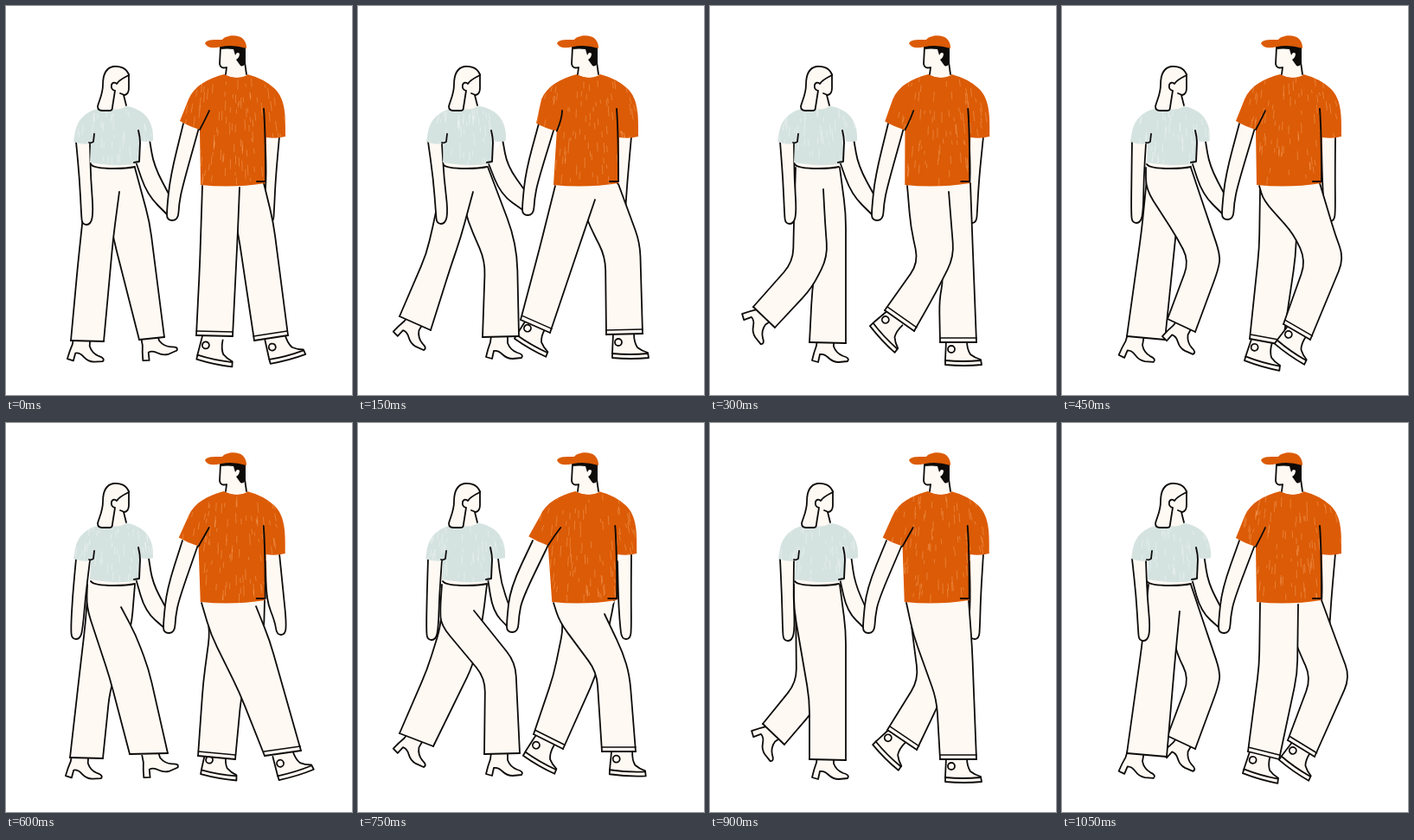
An HTML page with a canvas for the animation above (1200 ms loop, 400x450 px).

```html
<!DOCTYPE html>
<html lang="en">
<head>
<meta charset="utf-8">
<title>Walking couple</title>
<style>
  html, body { margin: 0; width: 100%; height: 100%; overflow: hidden; background: #fff; }
  canvas { display: block; width: 400px; height: 450px; }
</style>
</head>
<body>
<canvas id="stage"></canvas>
<script>
const STEP_MS = 150;
const INK = '#0d0b0a', CREAM = '#fff9f3', ORANGE = '#dc5b06', MINT = '#d5e3e0';
const canvas = document.getElementById('stage');
const ctx = canvas.getContext('2d');
const ratio = window.devicePixelRatio || 1;
canvas.width = 400 * ratio;
canvas.height = 450 * ratio;

// Legs: [left edge, right edge]; feet, near then far: [ankle x, ankle y, angle].
const woman = [
  { head: 0, top: 0, arm: [87, 252],
    near: ['97,187 92,215 83,300 75,387', '131,215 124,268 113,388'],
    far: ['112,200 124,268 154,386', '149,187 166,250 183,383'],
    feet: [[89, 388, 3], [168, 385, -18]] },
  { head: -1, top: 1, arm: [90, 251],
    near: ['98,187 90,240 79,287 48,359', '133,215 119,267 107,302 84,375'],
    far: ['115,200 127,249 147,295 144,383', '150,186 178,260 184,290 186,382'],
    feet: [[66, 367, 30], [165, 385, 0]] },
  { head: -1, top: 0, arm: [86, 251],
    near: ['99,187 97,250 96,296 50,348', '131,212 133,250 136,290 118,326 75,372'],
    far: ['115,200 122,300 118,330 115,389', '150,187 157,240 157,390'],
    feet: [[64, 359, 57], [135, 389, 0]] },
  { head: 2, top: 1, arm: [80, 250],
    near: ['97,187 97,212 133,268 147,295 122,362', '149,187 165,235 183,288 181,304 154,377'],
    far: ['98,200 92,260 75,382', '136,218 131,270 119,386'],
    feet: [[141, 372, 29], [86, 386, 10]] },
  { head: 0, top: 0, arm: [75, 249],
    near: ['94,187 93,213 120,295 143,383', '133,213 150,245 165,285 187,382'],
    far: ['94,200 92,230 85,290 74,387', '149,187 145,235 120,310 112,388'],
    feet: [[169, 385, -18], [87, 388, 3]] },
  { head: -1, top: 0, arm: [79, 250],
    near: ['97,187 95,215 96,234 147,295 146,383', '134,217 182,277 187,382'],
    far: ['97,195 96,234 80,285 48,359', '149,187 144,228 133,280 87,374'],
    feet: [[165, 385, 0], [66, 367, 30]] },
  { head: 0, top: 1, arm: [84, 251],
    near: ['97,187 97,215 115,320 115,389', '150,187 157,240 157,390'],
    far: ['99,200 100,300 61,348', '136,215 136,285 122,330 86,372'],
    feet: [[135, 389, 0], [75, 359, 57]] },
  { head: 2, top: 2, arm: [88, 251],
    near: ['100,187 92,260 75,382', '136,218 131,270 121,386'],
    far: ['118,200 133,268 147,295 122,362', '149,187 165,235 183,288 181,304 154,377'],
    feet: [[86, 385, 10], [141, 372, 29]] }
];

const man = [
  { sleeve: 0, arm: [310, 250], hand: [186, 243],
    near: ['227,208 224,300 220,381', '270,210 268,260 262,382'],
    far: ['255,212 268,260 287,387', '298,205 309,250 326,381'],
    feet: [[239, 388, 12], [313, 387, -15]] },
  { sleeve: 4, arm: [310, 237], hand: [190, 237],
    near: ['228,208 210,280 188,363', '274,224 256,277 222,378'],
    far: ['252,212 268,255 286,290 287,380', '301,206 326,274 329,379'],
    feet: [[205, 371, 30], [308, 383, 0]] },
  { sleeve: 1, arm: [309, 250], hand: [187, 243],
    near: ['228,208 232,255 241,297 202,352', '276,215 282,290 262,330 236,376'],
    far: ['250,212 270,315 265,340 266,389', '301,205 303,260 308,389'],
    feet: [[212, 364, 47], [286, 391, 0]] },
  { sleeve: 0, arm: [316, 248], hand: [185, 242],
    near: ['228,208 233,225 268,264 282,295 256,368', '298,205 316,265 326,292 287,386'],
    far: ['229,212 228,280 217,385', '273,212 270,290 255,392'],
    feet: [[271, 379, 35], [231, 391, 16]] },
  { sleeve: -1, arm: [324, 244], hand: [182, 238],
    near: ['226,208 237,245 270,312 299,385', '289,212 305,252 341,379'],
    far: ['230,212 236,240 228,300 222,385', '299,205 298,244 272,315 265,389'],
    feet: [[322, 386, -17], [243, 385, 10]] },
  { sleeve: -3, arm: [316, 249], hand: [172, 237],
    near: ['226,208 233,230 276,288 282,380', '285,221 306,265 314,292 321,380'],
    far: ['230,212 238,234 226,292 203,360', '296,206 291,233 275,292 237,377'],
    feet: [[306, 383, 3], [215, 371, 30]] },
  { sleeve: -1, arm: [312, 249], hand: [177, 238],
    near: ['227,208 235,245 262,320 266,389', '299,205 303,260 308,389'],
    far: ['230,212 241,297 205,355', '280,215 280,290 262,330 239,378'],
    feet: [[286, 391, 0], [215, 365, 45]] },
  { sleeve: 0, arm: [310, 239], hand: [181, 238],
    near: ['229,208 228,280 215,380', '273,210 272,290 251,389'],
    far: ['255,212 273,262 288,295 261,367', '300,205 322,265 333,294 292,386'],
    feet: [[229, 386, 16], [276, 378, 35]] }
];

const points = text => text.split(' ').map(pair => pair.split(',').map(Number));

// Polyline with rounded corners; a large radius makes it one flowing curve.
function trace(path, pts, radius, start = 'moveTo') {
  const towards = (p, q) => {
    const d = Math.hypot(q[0] - p[0], q[1] - p[1]);
    const t = Math.min(radius / d, 0.5);
    return [p[0] + (q[0] - p[0]) * t, p[1] + (q[1] - p[1]) * t];
  };
  path[start](...pts[0]);
  for (let i = 1; i < pts.length - 1; i++) {
    path.lineTo(...towards(pts[i], pts[i - 1]));
    path.quadraticCurveTo(...pts[i], ...towards(pts[i], pts[i + 1]));
  }
  path.lineTo(...pts[pts.length - 1]);
  return path;
}

const curve = (pts, radius = 60) => trace(new Path2D(), pts, radius);
const asPath = shape => typeof shape === 'string' ? new Path2D(shape) : shape;

// Closed area between two edges that run side by side.
function between(left, right, radius, corner) {
  const area = trace(new Path2D(), left, radius);
  trace(area, right.slice().reverse(), radius, 'lineTo');
  if (corner) area.lineTo(...corner);
  return area;
}

function fill(shape, color = CREAM) {
  ctx.fillStyle = color;
  ctx.fill(asPath(shape));
}

function line(shape, width = 1.8) {
  ctx.lineWidth = width;
  ctx.stroke(asPath(shape));
}

function outlined(shape) {
  fill(shape);
  line(shape);
}

function at(x, y, angle, draw) {
  ctx.save();
  ctx.translate(x, y);
  ctx.rotate(angle * Math.PI / 180);
  draw();
  ctx.restore();
}

function boot() {
  outlined('M-11 -4 L-12 4 Q-15 12 -17 21 L-10 23 L-8 14 Q-3 13 2 18 Q7 23 14 23 L24 22 Q27 18 19 16 Q11 13 8 5 L8 -4');
}

function sneaker() {
  outlined('M-13 -4 L-14 18 L-14 24 Q8 26 28 24 L27 18 Q20 16 15 12 Q11 6 11 -4');
  line('M-14 19 Q6 21 27 19');
  line('M-3 6 A4 4 0 1 1 -11 6 A4 4 0 1 1 -3 6');
}

function leg(edges, corner, cuff) {
  const radius = 16;
  const [left, right] = edges.map(points);
  const [a, b] = [left, right].map(edge => edge[edge.length - 1]);
  fill(between(left, right, radius, corner));
  line(curve(left, radius));
  line(curve(right, radius));
  line(curve([a, b]));
  if (cuff) {
    const d = Math.hypot(b[0] - a[0], b[1] - a[1]) / 5;
    const nx = (b[1] - a[1]) / d, ny = (a[0] - b[0]) / d;
    line(curve([[a[0] + nx, a[1] + ny], [b[0] + nx, b[1] + ny]]), 1.5);
  }
}

function legs(pose, shoe, corner, cuff) {
  at(...pose.feet[1], shoe);
  leg(pose.far, null, cuff);
  at(...pose.feet[0], shoe);
  leg(pose.near, corner, cuff);
}

// Pale crayon streaks inside a shirt.
function streaks(shape, box, count, color, seed) {
  let state = seed * 7919 + 17;
  const random = () => (state = (state * 16807) % 2147483647) / 2147483647;
  random();
  ctx.save();
  ctx.clip(asPath(shape));
  ctx.strokeStyle = color;
  ctx.lineWidth = 0.8;
  for (let i = 0; i < count; i++) {
    const x = box[0] + random() * box[2], y = box[1] + random() * box[3];
    const lean = (x - box[0] - box[2] / 2) * 0.03;
    ctx.beginPath();
    ctx.moveTo(x, y);
    ctx.lineTo(x + lean, y + 3 + random() * 9);
    ctx.stroke();
  }
  ctx.restore();
}

function womanArm([x, b]) {
  outlined(curve([[81, 157], [(81 + 2 * x) / 3, 200], [x, b - 12], [x + 1, b + 1], [x + 11, b + 1],
    [x + 14, b - 14], [(x + 109) / 2, 200], [97, 159]]));
}

function manArm([x, b]) {
  outlined(curve([[300, 160], [301, 205], [x - 13, b - 14], [x - 11, b + 1], [x - 1, b + 1],
    [x, b - 14], [(315 + 2 * x) / 3, 200], [316, 151]]));
}

function joinedArms([x, y], sleeve) {
  const swing = x - 186;
  const upper = [[166 + swing * 0.3, 155], [171 + swing * 0.4, 185], [x + 4, y - 22]];
  const lower = [[150, 180], [163 + swing * 0.5, 218], [x + 2, y]];
  fill(between(upper, lower, 60));
  line(curve(upper));
  line(curve(lower));
  outlined(curve([[205 + sleeve, 136], [x + 4, y - 46], [x, y - 8], [x, y + 5], [x + 13, y + 5],
    [x + 14, y - 14], [x + 18, y - 34], [223 + sleeve, 141]]));
}

function womanTop(dx, seed) {
  ctx.save();
  ctx.translate(dx, 0);
  const shirt = 'M107 119 C94 121 83 130 80 145 L78 157 Q88 161 98 159 L97 181 Q125 186 149 183 L155 180 L155 156 Q163 158 170 156 C171 139 165 126 152 120 Q145 116 138 116 Q124 121 107 119 Z';
  fill(shirt, MINT);
  streaks(shirt, [80, 118, 90, 62], 60, 'rgba(255,255,255,.4)', seed + 1);
  line('M102 148 L101 157 Q98 159 96 158');
  line('M153 144 Q155 152 155 158 L154 180 L148 181', 1.9);
  ctx.restore();
}

function womanHead(dx) {
  ctx.save();
  ctx.translate(dx, 0);
  fill('M124 92 L142 78 L142 97 Q140 103 137 104 L139 116 Q131 121 122 119 Z');
  line('M142 79 L142 95 Q142 102 137 103 L132 101');
  line('M136 103 L139 115');
  outlined('M142 80 C140 72 132 69 124 70 C114 72 112 81 112 91 C112 102 108 108 106 116 Q106 121 111 121 L120 121 Q123 121 123 117 L126 98 Q121 97 122 91 Q124 87 128 90 Q130 86 142 80 Z');
  ctx.restore();
}

// The raised sleeve swings with the joined hands; the body stays put.
function manTop(s, seed) {
  ctx.save();
  ctx.translate(s * 0.25, 0);
  const tip = `${201 + s} ${133 + s * 0.6}`, pit = `${224 + s * 1.2} ${143 + s * 0.4}`;
  const shirt = `M252 79 C233 84 218 92 211 108 L${tip} Q${211 + s} ${139 + s * 0.6} ${pit} L225 207 Q262 211 300 205 L301 152 Q312 154 323 151 C323 129 324 108 310 95 Q298 84 279 79 Q266 86 252 79 Z`;
  fill(shirt, ORANGE);
  streaks(shirt, [204, 82, 118, 118], 110, 'rgba(255,200,150,.4)', seed + 31);
  line(`M235 121 Q${231 + s} 130 ${pit}`);
  line('M298 119 Q300 145 300 203 L290 203', 1.9);
  ctx.restore();
}

function manHead() {
  fill('M248 46 L247 68 Q249 73 255 71 L254 79 Q267 86 279 80 L276 55 Z');
  line('M248 47 L247 67 Q248 73 255 71 L254 79');
  line('M276 65 L278 79');
  fill('M248 46 Q262 40 277 47 L277 66 Q274 71 271 69 L266 62 Q270 60 270 55 Q267 52 265 57 L263 50 Q256 49 248 50 Z', INK);
  fill('M230 43 C232 38 243 39 250 39 C255 33 269 33 274 38 Q278 42 278 49 Q262 44 249 47 Q233 51 230 43 Z', ORANGE);
}

function drawStep(i) {
  const w = woman[i], m = man[i];
  ctx.setTransform(ratio, 0, 0, ratio, 0, 0);
  ctx.fillStyle = '#fff';
  ctx.fillRect(0, 0, 400, 450);
  ctx.strokeStyle = INK;
  ctx.lineCap = ctx.lineJoin = 'round';

  manArm(m.arm);
  legs(m, sneaker, [297, 206], true);
  fill('M98 178 L153 178 L149 188 L98 188 Z');
  legs(w, boot, [148, 188], false);
  line('M98 183 Q101 188 125 188 Q140 188 149 186', 1.9);
  womanArm(w.arm);
  joinedArms(m.hand, m.sleeve);
  womanTop(w.top, i);
  womanHead(w.head);
  manTop(m.sleeve, i);
  manHead();
}

let shown = -1;
function tick() {
  const step = Math.floor(performance.now() / STEP_MS) % woman.length;
  if (step !== shown) drawStep(shown = step);
  requestAnimationFrame(tick);
}
tick();
</script>
</body>
</html>
```
